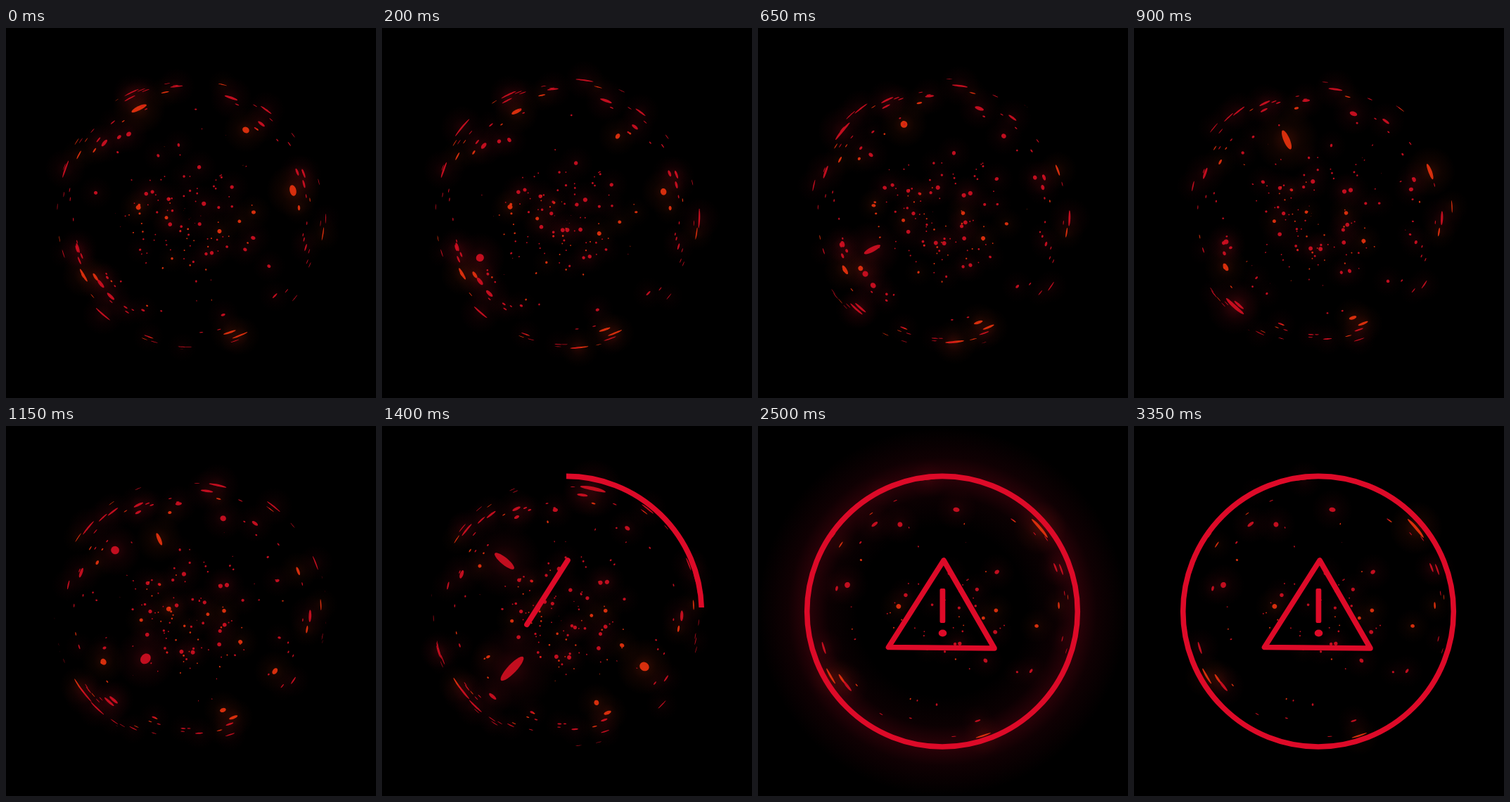
Animation of 526 by 526 pixels, one loop 4000 ms. Source, as an HTML page with a canvas:

```html
<!DOCTYPE html>
<html lang="en">
<head>
<meta charset="utf-8">
<title>Alert</title>
<style>
html, body { margin: 0; width: 100%; height: 100%; overflow: hidden; background: #000; }
canvas { display: block; width: 526px; height: 526px; }
</style>
</head>
<body>
<canvas id="stage" width="526" height="526"></canvas>
<script>
const ctx = document.getElementById('stage').getContext('2d');
const LOOP = 4000, STEP = 50, REST = 2400, CX = 262, CY = 263.7;
const FOLD = 112, RIM = 82; // radius where the two lens images meet, and the band outside it
const RED = '221,10,40', ORANGE = '235,52,14', SPARK = '212,16,34';
const TAU = Math.PI * 2;
const clamp = x => Math.max(0, Math.min(1, x));
const ramp = (t, from, to) => clamp((t - from) / (to - from));

let seed = 7321;
function rand() {
  seed = (seed + 0x6D2B79F5) | 0;
  let h = Math.imul(seed ^ (seed >>> 15), 1 | seed);
  h = (h + Math.imul(h ^ (h >>> 7), 61 | h)) ^ h;
  return ((h ^ (h >>> 14)) >>> 0) / 4294967296;
}

// Drift time: steady, then slowing to rest.
function drift(t) {
  const x = ramp(t, 1800, REST);
  return Math.min(t, 1800) + (REST - 1800) * (x - x * x / 2);
}

// Lens: q is the distance from the fold, 0 at the fold and 1 at the rim or the centre.
const toRadius = (q, outer) => outer ? FOLD + RIM * q : FOLD * Math.sqrt(Math.max(0, 1 - q));
const fromRadius = (r, outer) => outer ? (r - FOLD) / RIM : 1 - (r / FOLD) ** 2;

const sparks = [];

// A bright spark that swells and shrinks around one moment.
function flare(at, x, y, size, color = SPARK) {
  const dx = x - CX, dy = y - CY, r = Math.hypot(dx, dy), outer = r > FOLD;
  sparks.push({
    angle: Math.atan2(dy, dx), outer, u: fromRadius(r, outer) ** 2, at: drift(at), color,
    grow: t => size * Math.max(0, 1 - ((Math.min(t, REST) - at) / 400) ** 2)
  });
}

flare(0, 189, 114, 6, ORANGE);
flare(0, 341, 145, 4.6, ORANGE);
flare(0, 408, 231, 6, ORANGE);
flare(450, 162, 315, 9);
flare(450, 117, 144, 7);
flare(450, 280, 450, 6, ORANGE);
flare(900, 217, 159, 8, ORANGE);
flare(900, 143, 396, 6.5);
flare(900, 421, 204, 5.5, ORANGE);
flare(1400, 174, 192, 9.5);
flare(1400, 185, 345, 12);
flare(1400, 373, 342, 6.5, ORANGE);
flare(1400, 300, 89, 7);
flare(1800, 116, 254, 6.5, ORANGE);
flare(1800, 160, 359, 7, ORANGE);
flare(1800, 282, 150, 6, ORANGE);
flare(REST, 401, 145, 6, ORANGE);
flare(REST, 127, 226, 4);

// Dust on both sides of the fold; over half of it goes out as the sign closes.
for (let i = 0; i < 220; i++) {
  const outer = i % 2 > 0, stays = rand() < 0.42;
  const size = outer ? 1.3 + 3 * rand() ** 4 : 0.9 + 2.6 * rand() ** 4;
  sparks.push({
    angle: rand() * TAU, outer, u: rand(), at: 0, loops: true,
    color: rand() < 0.25 ? ORANGE : SPARK,
    grow: t => size * (stays ? 1 : 1 - ramp(t, 1800, 2300))
  });
}

function drawGlow(r, size, color) {
  const reach = 14 + size * 4, power = Math.min(0.2, size * 0.032);
  const glow = ctx.createRadialGradient(r, 0, 0, r, 0, reach);
  glow.addColorStop(0, `rgba(${color},${power})`);
  glow.addColorStop(0.45, `rgba(${color},${power * 0.35})`);
  glow.addColorStop(1, `rgba(${color},0)`);
  ctx.fillStyle = glow;
  ctx.fillRect(r - reach, -reach, reach * 2, reach * 2);
}

function drawSpark(p, t) {
  let u = p.u - 0.0004 * (drift(t) - p.at), size = p.grow(t);
  if (p.loops) {
    u -= Math.floor(u);
    size *= clamp(u * 14) * clamp((1 - u) * 14);
  }
  if (size < 0.2 || u > 1.05) return;
  const q = Math.sqrt(Math.max(0, u)), r = toRadius(q, p.outer);
  // The lens stretches along the radius at the fold and along the arc at the rim.
  const bend = Math.exp((p.outer ? 4 * q - 1.3 : -1.3 * Math.exp(-6 * q)) / 2);
  const a = size * bend, b = size / bend;

  ctx.save();
  ctx.translate(CX, CY);
  ctx.rotate(p.angle);
  if (size > 1.6) drawGlow(r, size, p.color);
  ctx.beginPath();
  for (let i = 0; i < 28; i++) {
    const f = i / 28 * TAU, y = a * Math.cos(f);
    ctx.lineTo(r + b * Math.sin(f) - y * y / (2 * Math.max(r, 10)), y);
  }
  ctx.fillStyle = `rgba(${p.color},0.9)`;
  ctx.fill();
  ctx.restore();
}

function drawHalo(t) {
  const power = ramp(t, 2150, 2500) * (1 - ramp(t, 2500, 3050));
  if (!power) return;
  const halo = ctx.createRadialGradient(CX, CY, 120, CX, CY, 262);
  [[0, 0], [0.3, 0.05], [0.51, 0.2], [0.7, 0.07], [1, 0]].forEach(([stop, v]) =>
    halo.addColorStop(stop, `rgba(${RED},${v * power})`));
  ctx.fillStyle = halo;
  ctx.fillRect(0, 0, 526, 526);
}

function drawSign(t) {
  const done = 1 - (1 - ramp(t, 1210, 2240)) ** 1.38;
  if (!done) return;
  ctx.strokeStyle = ctx.fillStyle = `rgb(${RED})`;
  ctx.lineWidth = 7.6;
  ctx.lineJoin = 'round';

  ctx.lineCap = 'butt';
  ctx.beginPath();
  ctx.arc(CX, CY, 192.3, -TAU / 4, -TAU / 4 + TAU * done);
  ctx.stroke();

  ctx.lineCap = 'round';
  ctx.beginPath();
  ctx.moveTo(264, 191);
  ctx.lineTo(185.5, 314.5);
  ctx.lineTo(336, 316);
  ctx.closePath();
  ctx.setLineDash(done < 1 ? [441 * done, 999] : []);
  ctx.stroke();
  ctx.setLineDash([]);

  ctx.globalAlpha = ramp(t, 1750, 2000);
  ctx.beginPath();
  ctx.roundRect(258.5, 231, 7.8, 49, 2);
  ctx.fill();
  ctx.globalAlpha = ramp(t, 1900, 2150);
  ctx.beginPath();
  ctx.ellipse(262.5, 294.5, 5.8, 5, 0, 0, TAU);
  ctx.fill();
  ctx.globalAlpha = 1;
}

function draw(t) {
  ctx.fillStyle = '#000';
  ctx.fillRect(0, 0, 526, 526);
  drawHalo(t);
  for (const p of sparks) drawSpark(p, t);
  drawSign(t);
}

const start = performance.now();
function tick() {
  const t = (performance.now() - start) % LOOP;
  draw(Math.floor(t / STEP) * STEP);
  requestAnimationFrame(tick);
}
tick();
</script>
</body>
</html>
```
